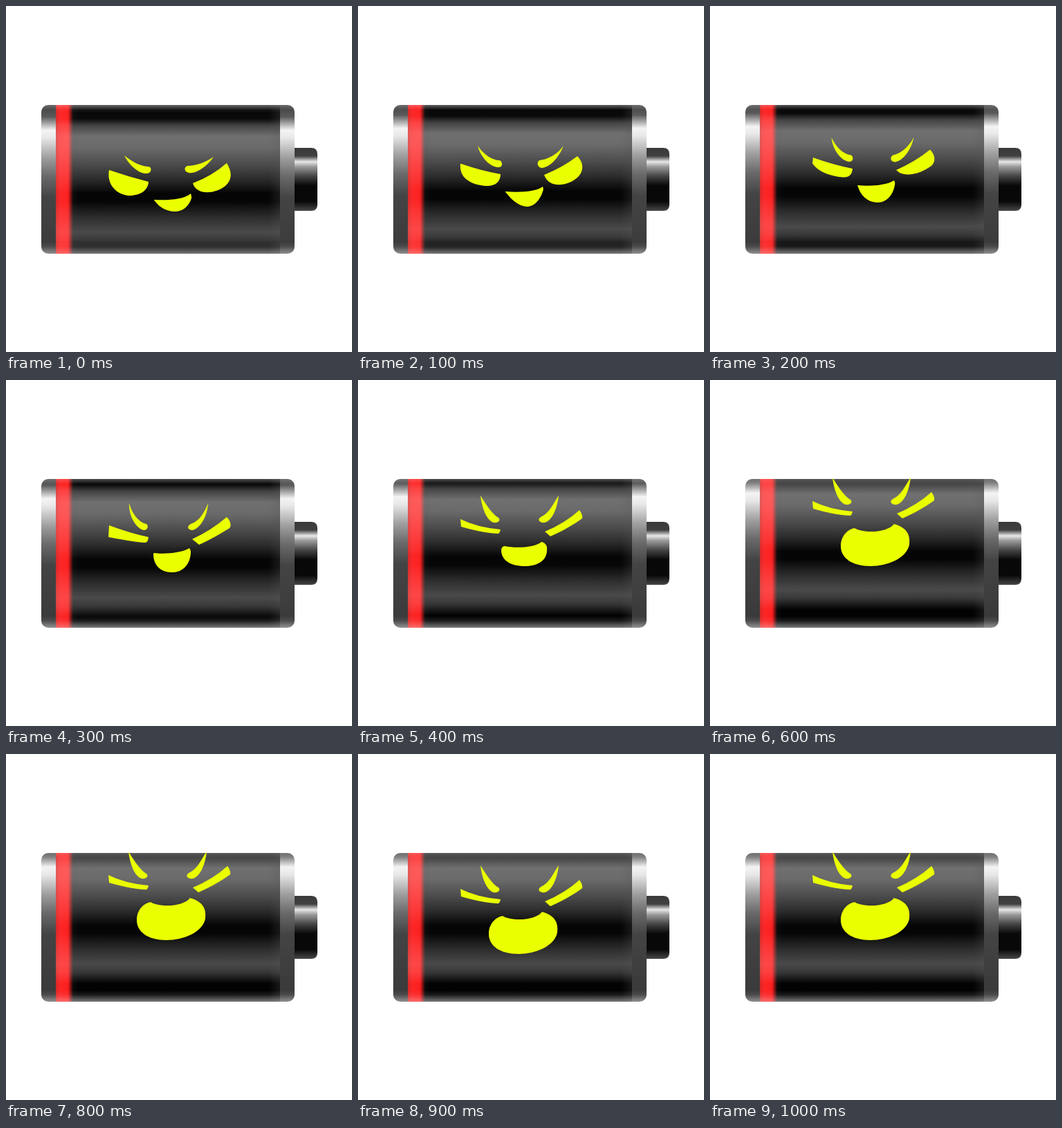
An HTML page that plays this animation: 500 by 500 pixels, repeating every 1100 ms.

```html
<!DOCTYPE html>
<html lang="en">
<head>
<meta charset="utf-8">
<title>Laughing battery</title>
<style>
html, body { margin: 0; width: 100%; height: 100%; overflow: hidden; background: #fff; }
svg { display: block; width: 500px; height: 500px; }
.glow { mix-blend-mode: screen; }
</style>
</head>
<body>
<svg viewBox="0 0 500 500">
  <defs>
    <clipPath id="shell"><rect x="51" y="143" width="366" height="215" rx="10"/></clipPath>
    <linearGradient id="gloss" gradientUnits="userSpaceOnUse" x1="0" y1="100" x2="0" y2="400">
      <stop offset=".13" stop-color="#404040"/>
      <stop offset=".18" stop-color="#080808"/>
      <stop offset=".21" stop-color="#0a0a0a"/>
      <stop offset=".243" stop-color="#444"/>
      <stop offset=".295" stop-color="#707070"/>
      <stop offset=".35" stop-color="#6a6a6a"/>
      <stop offset=".433" stop-color="#4a4a4a"/>
      <stop offset=".5" stop-color="#2c2c2c"/>
      <stop offset=".57" stop-color="#050505"/>
      <stop offset=".61" stop-color="#060606"/>
      <stop offset=".683" stop-color="#2c2c2c"/>
      <stop offset=".755" stop-color="#4a4a4a"/>
      <stop offset=".795" stop-color="#383838"/>
      <stop offset=".85" stop-color="#030303"/>
      <stop offset=".92" stop-color="#000"/>
    </linearGradient>
    <linearGradient id="cap" gradientUnits="userSpaceOnUse" x1="0" y1="143" x2="0" y2="358">
      <stop offset="0" stop-color="#404040"/>
      <stop offset=".08" stop-color="#5a5a5a"/>
      <stop offset=".17" stop-color="#f4f4f4"/>
      <stop offset=".22" stop-color="#e8e8e8"/>
      <stop offset=".35" stop-color="#a0a0a0"/>
      <stop offset=".48" stop-color="#696969"/>
      <stop offset=".62" stop-color="#444"/>
      <stop offset="1" stop-color="#3a3a3a"/>
    </linearGradient>
    <linearGradient id="rim" x1="0" y1="0" x2="0" y2="1">
      <stop offset="0" stop-color="#ccc" stop-opacity="0"/>
      <stop offset=".4" stop-color="#ccc" stop-opacity=".12"/>
      <stop offset="1" stop-color="#ccc" stop-opacity=".6"/>
    </linearGradient>
    <linearGradient id="top" x1="0" y1="0" x2="0" y2="1">
      <stop offset="0" stop-color="#999" stop-opacity=".5"/>
      <stop offset="1" stop-color="#999" stop-opacity="0"/>
    </linearGradient>
    <linearGradient id="ends">
      <stop offset="0" stop-color="#555" stop-opacity=".35"/>
      <stop offset=".1" stop-color="#555" stop-opacity="0"/>
      <stop offset=".95" stop-color="#555" stop-opacity="0"/>
      <stop offset="1" stop-color="#555" stop-opacity=".25"/>
    </linearGradient>
    <linearGradient id="red">
      <stop offset="0" stop-color="#e01010" stop-opacity=".85"/>
      <stop offset=".25" stop-color="#fa1010"/>
      <stop offset=".7" stop-color="#fa1010"/>
      <stop offset="1" stop-color="#c00808" stop-opacity="0"/>
    </linearGradient>
    <linearGradient id="knob" x1="0" y1="0" x2="0" y2="1">
      <stop offset="0" stop-color="#3a3a3a"/>
      <stop offset=".13" stop-color="#404040"/>
      <stop offset=".22" stop-color="#e8e8e8"/>
      <stop offset=".3" stop-color="#999"/>
      <stop offset=".45" stop-color="#444"/>
      <stop offset=".6" stop-color="#080808"/>
      <stop offset=".85" stop-color="#080808"/>
      <stop offset="1" stop-color="#484848"/>
    </linearGradient>
  </defs>

  <path d="M416 205H441Q450 205 450 214V287Q450 296 441 296H416Z" fill="url(#knob)"/>
  <g clip-path="url(#shell)">
    <path d="M51 143H73V358H51ZM395 143H417V358H395Z" fill="url(#cap)"/>
    <rect x="72" y="143" width="324" height="215" fill="url(#gloss)"/>
    <rect x="72" y="143" width="324" height="215" fill="url(#ends)"/>
    <rect x="51" y="143" width="366" height="7" fill="url(#top)"/>
    <rect x="51" y="341" width="366" height="17" fill="url(#rim)"/>
    <rect x="72" y="143" width="25" height="215" fill="url(#red)" opacity=".3"/>
    <rect class="glow" x="72" y="143" width="25" height="215" fill="url(#red)"/>
  </g>
  <g id="face" fill="#eaff00">
    <g id="upper">
      <path id="leftEye"/><path id="rightEye"/>
      <path id="leftBrow"/><path id="rightBrow"/>
    </g>
    <path id="mouth"/>
  </g>
</svg>
<script>
const $ = id => document.getElementById(id);

// Key poses, at the steps listed in KEYS; the upper face only slides after step 4.
const KEYS = [0, 1, 3, 4, 6];
const POSES = {
  leftEye: [
    'M149 237Q178 247 206 254C205 268 192 274 178 274C160 273 145 258 149 237Z',
    'M149 228Q178 238 206 243C206 254 198 261 184 260C162 258 146 248 148 228Z',
    'M149 210Q178 221 206 227C205 233 204 235 200 235C184 234 165 230 148 227Z',
    'M148 201Q172 213 206 216C205 220 204 222 202 222C184 221 166 217 149 212Z'
  ],
  rightEye: [
    'M270 256Q297 246 319 227C327 240 327 251 317 260C302 272 275 274 270 256Z',
    'M269 244Q296 233 317 217C326 226 327 238 318 247C303 261 276 264 269 244Z',
    'M269 230Q297 217 319 198C325 204 326 211 323 214C310 222 297 230 279 238Z',
    'M270 219Q299 207 320 188C323 192 325 197 324 200C310 210 296 218 278 226Z'
  ],
  leftBrow: [
    'M171 216C182 225 195 232 206 232C211 233 211 241 204 242C192 243 178 230 171 216Z',
    'M173 202C182 215 194 223 205 223C210 226 209 234 202 233C190 232 177 218 173 202Z',
    'M178 178C182 193 192 206 203 208C207 212 204 217 199 217C187 214 177 195 178 178Z',
    'M177 167C185 180 194 194 203 199C207 203 202 207 196 206C186 203 179 185 177 167Z'
  ],
  rightBrow: [
    'M300 218C290 225 275 231 262 231C257 233 257 239 264 241C276 243 292 230 300 218Z',
    'M297 202C288 215 273 222 262 223C258 226 259 233 265 234C279 233 291 217 297 202Z',
    'M292 178C286 193 279 204 267 208C261 211 262 217 270 217C282 213 291 196 292 178Z',
    'M290 167C281 180 277 192 264 198C258 202 263 207 270 206C281 203 288 185 290 167Z'
  ],
  mouth: [
    'M214 280C235 281 256 280 267 271C268 274 268 276 268 278C264 290 255 297 244 297C232 297 221 290 216 283C215 282 214 281 214 280Z',
    'M213 268C235 270 258 268 267 261C268 264 268 266 267 268C263 280 255 290 244 290C232 289 222 280 215 271C214 270 213 269 213 268Z',
    'M214 250C228 252 254 250 265 243C267 245 267 248 267 250C266 266 256 278 240 278C222 278 213 266 213 252C213 251 213 250 214 250Z',
    'M212 240C225 243 255 243 265 234C271 235 274 240 273 246C273 262 258 269 241 269C220 269 207 260 207 246C207 243 209 240 212 240Z',
    'M209 214C222 222 256 221 266 208C283 213 290 222 288 238C284 258 256 269 232 269C205 269 189 257 189 240C189 226 198 216 209 214Z'
  ]
};

function blend(a, b, k) {
  const to = b.match(/\d+/g);
  let i = 0;
  return a.replace(/\d+/g, n => +n + (to[i++] - n) * k);
}

function poseAt(list, step) {
  let i = 0;
  while (i < list.length - 2 && step > KEYS[i + 1]) i++;
  const k = (step - KEYS[i]) / (KEYS[i + 1] - KEYS[i]);
  return blend(list[i], list[i + 1], Math.min(k, 1));
}

const shift = (id, attr, y) => $(id).setAttribute(attr, `translate(0 ${y})`);

// Rise for six steps, then laugh: the face drops on every other step.
function draw(tick) {
  const step = Math.min(tick, 6);
  const drop = tick > 6 && tick % 2 ? 20 : 0;
  for (const id in POSES) $(id).setAttribute('d', poseAt(POSES[id], step));
  shift('upper', 'transform', -13 * Math.max(0, step - 4));
  shift('face', 'transform', drop);
  shift('gloss', 'gradientTransform', -3.9 * step);
  shift('cap', 'gradientTransform', -2.7 * step);
}

const start = performance.now();
function loop() {
  draw(Math.floor((performance.now() - start) / 100) % 11);
  requestAnimationFrame(loop);
}
loop();
</script>
</body>
</html>
```
